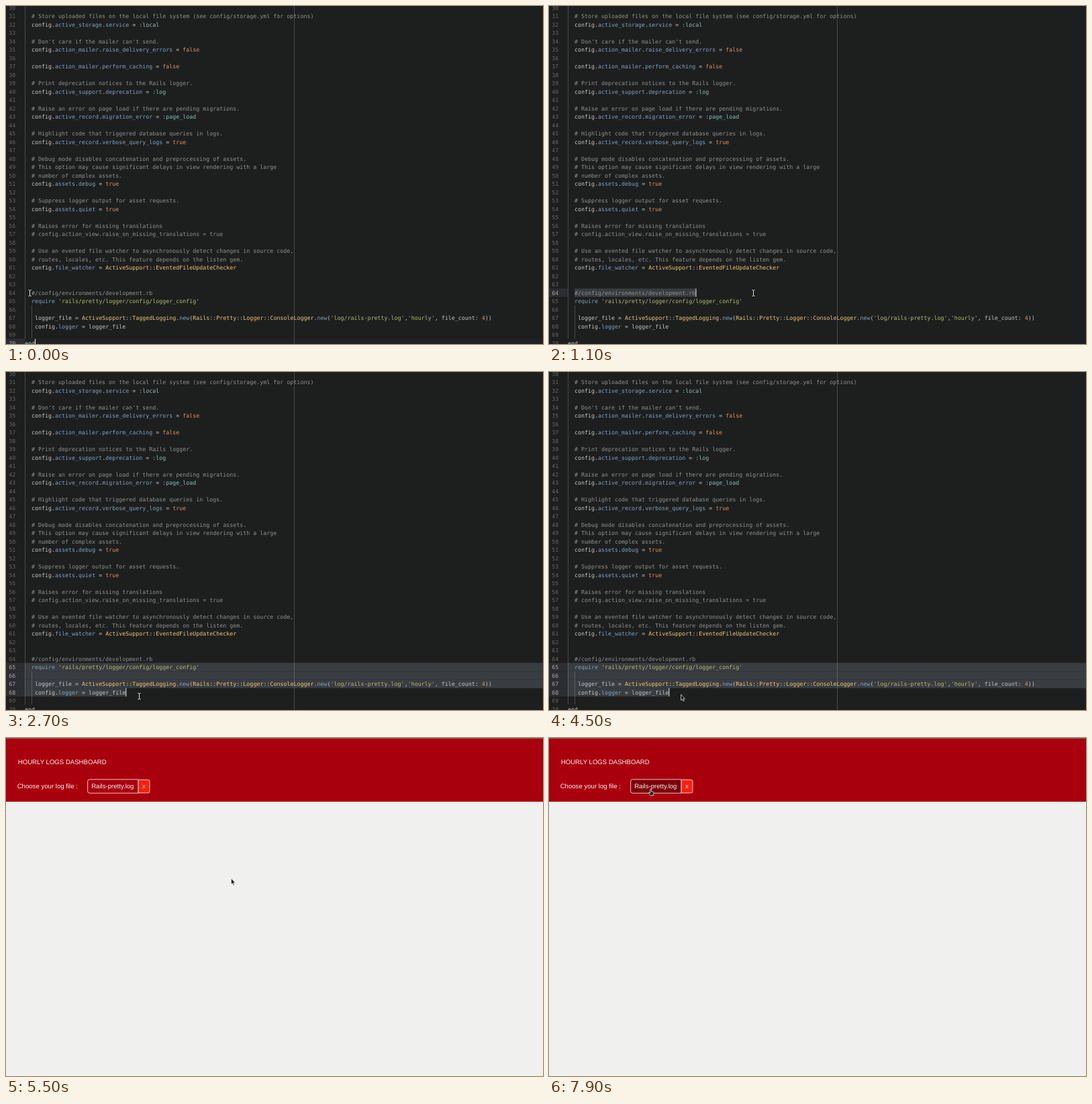
An HTML page for the animation above (8000 ms loop, 800 by 504 pixels).

```html
<!DOCTYPE html>
<html lang="en">
<head>
<meta charset="utf-8">
<title>Hourly logs</title>
<style>
html, body { margin: 0; width: 100%; height: 100%; overflow: hidden; background: #1d1f1f; }
svg { display: block; width: 800px; height: 504px; }
text { white-space: pre; text-rendering: geometricPrecision; }
#editor text { font: 8.325px "DejaVu Sans Mono", monospace; fill: #c5c8c6; }
#editor .num { fill: #626564; text-anchor: end; }
#editor .num.on { fill: #a4a6a5; }
#editor .comment { fill: #8f918f; }
.str { fill: #b5bd68; }
.const { fill: #f0c674; }
.sym { fill: #8abeb7; }
.lit { fill: #de935f; }
.fn { fill: #81a2be; }
#page text { font: 9.6px "Liberation Sans", Arial, sans-serif; fill: #f4f0f0; }
.cursor { visibility: hidden; }
</style>
</head>
<body>
<svg viewBox="0 0 800 504">
  <g id="editor">
    <rect width="800" height="504" fill="#1d1f1f"/>
    <rect id="row" x="28" width="772" height="12.5" fill="#202224"/>
    <g id="gutter" fill="#2c2e33"></g>
    <g id="selection" fill="#393c41"></g>
    <path d="M28.5 0V496M38.5 446V496M429.5 0V504" stroke="#c5c8c6" stroke-opacity=".25"/>
    <g id="code"></g>
    <rect id="caret" width="1" height="12.5" fill="#f0f0f0"/>
  </g>
  <g id="page">
    <rect width="800" height="504" fill="#f0f0ee"/>
    <rect width="800" height="95" fill="#a9000d"/>
    <rect width="800" height="1" fill="#85605f"/>
    <text x="17.8" y="38.6">HOURLY LOGS DASHBOARD</text>
    <text x="16.7" y="75">Choose your log file :</text>
    <path d="M197 62H214V82H197Z" fill="none"/>
    <path id="pick" d="M197 61.8H124.5Q121.7 61.8 121.7 64.6V79.4Q121.7 82.2 124.5 82.2H197Z" fill="#a9000d" stroke="#f4dcdc" stroke-width=".9"/>
    <path d="M197.3 62.3H211.5Q214 62.3 214 64.8V79.4Q214 81.9 211.5 81.9H197.3Z" fill="#f8200f" stroke="#f4dcdc" stroke-width=".9"/>
    <text x="127.2" y="75">Rails-pretty.log</text>
    <text x="203" y="75">x</text>
  </g>
  <g id="beam" class="cursor" fill="none" stroke-linecap="square">
    <path id="beamShape" d="M-1.8 -4.6Q0 -4.6 0 -3.6V3.6Q0 4.6 -1.8 4.6M1.8 -4.6Q0 -4.6 0 -3.6M0 3.6Q0 4.6 1.8 4.6" stroke="#111" stroke-width="2.2"/>
    <use href="#beamShape"/>
    <path d="M-1.8 -4.6Q0 -4.6 0 -3.6V3.6Q0 4.6 -1.8 4.6M1.8 -4.6Q0 -4.6 0 -3.6M0 3.6Q0 4.6 1.8 4.6" stroke="#eee" stroke-width="1"/>
  </g>
  <path id="arrow" class="cursor" d="M0 0V8.6L1.9 6.9L3.2 10L4.7 9.4L3.4 6.4H6Z" fill="#181818" stroke="#eee" stroke-width=".7" stroke-linejoin="round"/>
  <path id="hand" class="cursor" d="M-.9 0Q0 -.9 .8 0V3.2L3.6 3.8Q4.7 4.2 4.6 5.4L3.9 9.2H-.6L-3.5 5.6Q-3.2 4.4 -2 5L-.9 5.9Z" fill="#222" stroke="#f0e8e8" stroke-width=".8" stroke-linejoin="round"/>
</svg>
<script>
const source = `
  # Store uploaded files on the local file system (see config/storage.yml for options)
  config.active_storage.service = :local

  # Don't care if the mailer can't send.
  config.action_mailer.raise_delivery_errors = false

  config.action_mailer.perform_caching = false

  # Print deprecation notices to the Rails logger.
  config.active_support.deprecation = :log

  # Raise an error on page load if there are pending migrations.
  config.active_record.migration_error = :page_load

  # Highlight code that triggered database queries in logs.
  config.active_record.verbose_query_logs = true

  # Debug mode disables concatenation and preprocessing of assets.
  # This option may cause significant delays in view rendering with a large
  # number of complex assets.
  config.assets.debug = true

  # Suppress logger output for asset requests.
  config.assets.quiet = true

  # Raises error for missing translations
  # config.action_view.raise_on_missing_translations = true

  # Use an evented file watcher to asynchronously detect changes in source code,
  # routes, locales, etc. This feature depends on the listen gem.
  config.file_watcher = ActiveSupport::EventedFileUpdateChecker


  #/config/environments/development.rb
  require 'rails/pretty/logger/config/logger_config'

   logger_file = ActiveSupport::TaggedLogging.new(Rails::Pretty::Logger::ConsoleLogger.new('log/rails-pretty.log','hourly', file_count: 4))
   config.logger = logger_file

end`;
const FIRST = 30, LINE = 12.5, CHAR = 5.012, LEFT = 28, LOOP = 8000;
const $ = id => document.getElementById(id);
const rowTop = n => (n - FIRST) * LINE - 3.75;
const colX = c => LEFT + c * CHAR;
const clamp = (v, lo, hi) => Math.min(hi, Math.max(lo, v));

const token = /('[^']*')|((?:[A-Z]\w*(?:::)?)+)|(:\w+)|(\b(?:true|false|\d+)\b)|((?<=\.)\w+|require)/g;
const kinds = ['str', 'const', 'sym', 'lit', 'fn'];
const paint = s => s.replace(token, (m, ...groups) =>
  `<tspan class="${kinds[groups.slice(0, 5).findIndex(Boolean)]}">${m}</tspan>`);

$('code').innerHTML = source.split('\n').map((line, i) => {
  const y = rowTop(FIRST + i) + 9.3, body = line.trimStart();
  const comment = body[0] === '#';
  return `<text class="num" x="14.2" y="${y}">${FIRST + i}</text>` +
    `<text x="${colX(line.length - body.length)}" y="${y}"${comment ? ' class="comment"' : ''}>` +
    `${comment ? body : paint(body)}</text>`;
}).join('');
const numbers = document.querySelectorAll('.num');

// Pointer paths: time, x, y
const beamPath = [[0, 35.5, 428], [400, 35.5, 428], [700, 120, 427], [1000, 285, 427.5], [1100, 304.5, 428],
  [1400, 304.5, 428], [1700, 200, 466], [1800, 150, 474], [2000, 55, 455], [2200, 38, 444],
  [2300, 37, 438], [2500, 120, 465], [2700, 198.5, 483.5]];
const arrowPath = [[4500, 196.6, 480.8], [4800, 196.6, 480.8], [5200, 275, 335], [5500, 335.5, 209.5],
  [5600, 335.5, 209.5], [5800, 285, 135], [6000, 170, 50], [6100, 125, 22], [6200, 114, 5]];
const returnPath = [[7100, 240, 37], [7300, 244, 98], [7500, 200, 97], [7700, 162, 84], [7900, 151.6, 76.5]];

function along(path, t) {
  const i = path.findIndex(p => p[0] > t);
  if (i < 0) return path.at(-1).slice(1);
  const [a, b] = [path[Math.max(0, i - 1)], path[i]];
  const k = a === b ? 0 : (t - a[0]) / (b[0] - a[0]);
  return [a[1] + (b[1] - a[1]) * k, a[2] + (b[2] - a[2]) * k];
}

function place(id, pos) {
  $(id).style.visibility = pos ? 'visible' : 'hidden';
  if (pos) $(id).setAttribute('transform', `translate(${pos})`);
}

const bar = (x, row, w) => `<rect x="${x}" y="${rowTop(row)}" width="${w}" height="${LINE}"/>`;

// Anchor and caret of the text selection as row and column
function editing(t, [x, y]) {
  const col = Math.round((x - LEFT) / CHAR);
  if (t < 500) return { from: [70, 3], to: [70, 3], caret: t < 100 };
  if (t < 2100) return { from: [64, 2], to: [64, t < 1100 ? clamp(col, 2, 38) : 38], caret: t < 1300 || t >= 1700 };
  if (t < 2400) return { from: [65, 0], to: [65, 0], caret: true };
  const row = clamp(Math.floor((y + 3.75) / LINE) + FIRST, 65, 68);
  const blinkOff = t >= 3000 && t < 4200 && Math.floor((t - 3000) / 400) % 2 === 0;
  return { from: [65, 0], to: [row, row === 66 ? 0 : clamp(col, 0, 30)], caret: !blinkOff };
}

function drawEditor(t, pos) {
  const { from, to, caret } = editing(t, pos);
  let gutter = '', selection = '';
  for (let r = from[0]; r <= to[0]; r++) {
    gutter += bar(0, r, LEFT);
    const x = r === from[0] ? colX(from[1]) : LEFT;
    selection += bar(x, r, (r === to[0] ? colX(to[1]) : 800) - x);
  }
  $('gutter').innerHTML = gutter;
  $('selection').innerHTML = selection;
  numbers.forEach((n, i) => n.classList.toggle('on', i + FIRST >= from[0] && i + FIRST <= to[0]));
  const empty = String(from) === String(to);
  $('row').setAttribute('y', rowTop(to[0]));
  $('row').style.display = empty ? '' : 'none';
  $('caret').setAttribute('x', colX(to[1]));
  $('caret').setAttribute('y', rowTop(to[0]));
  $('caret').style.display = caret ? '' : 'none';
}

function draw(now) {
  const t = Math.floor(now % LOOP / 100) * 100;
  const onPage = t >= 4700;
  $('page').style.display = onPage ? '' : 'none';
  $('editor').style.display = onPage ? 'none' : '';
  const beam = along(beamPath, t);
  if (!onPage) drawEditor(t, beam);
  place('beam', t < 4500 && beam);

  const pointer = t >= 7100 ? along(returnPath, t) : t >= 4500 && t < 6300 && along(arrowPath, t);
  const hover = onPage && pointer && pointer[0] > 122 && pointer[0] < 197 && pointer[1] > 62 && pointer[1] < 82;
  place('arrow', !hover && pointer);
  place('hand', hover && pointer);
  $('pick').setAttribute('fill', hover ? '#7c0009' : '#a9000d');
}

const start = performance.now();
(function tick() {
  draw(performance.now() - start);
  requestAnimationFrame(tick);
})();
</script>
</body>
</html>
```
